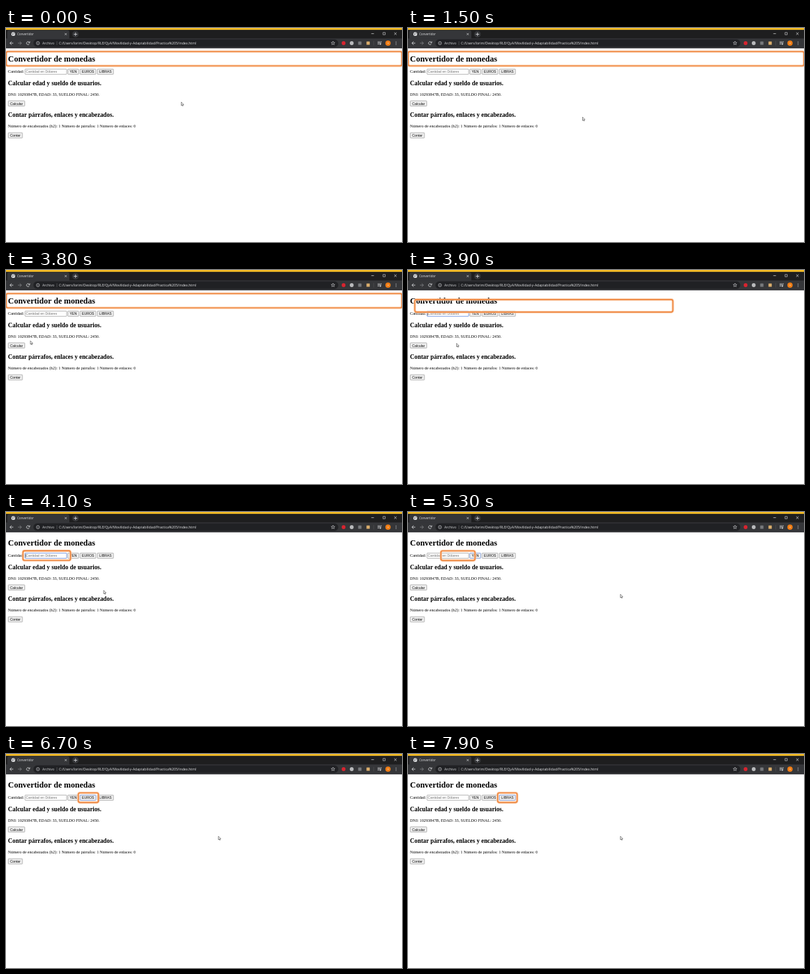
Write an HTML page with a canvas that moves like this. It is 600x325 px and loops after 8000 ms.

```html
<!DOCTYPE html>
<html lang="es">
<head>
<meta charset="utf-8">
<title>Convertidor</title>
<style>
html, body { margin: 0; width: 100%; height: 100%; overflow: hidden; background: #fff; }
canvas { display: block; width: 600px; height: 325px; }
</style>
</head>
<body>
<canvas id="stage"></canvas>
<script>
const W = 600, H = 325, LOOP = 8000;
const canvas = document.getElementById('stage');
const ctx = canvas.getContext('2d');
const dpr = window.devicePixelRatio || 1;
canvas.width = W * dpr;
canvas.height = H * dpr;

const SERIF = '"Liberation Serif", serif';
const SANS = '"Liberation Sans", sans-serif';
const UI = '"Open Sans", sans-serif';
const LIGHT = '#e4e5e7';

const clamp = v => Math.min(1, Math.max(0, v));
const mix = (a, b, k) => a + (b - a) * k;
const easeOut = k => 1 - (1 - k) ** 3;
const easeInOut = k => k * k * (3 - 2 * k);

function rect(x, y, w, h, color) {
  ctx.fillStyle = color;
  ctx.fillRect(x, y, w, h);
}

function box(x, y, w, h, r, fill, stroke, width) {
  ctx.beginPath();
  ctx.roundRect(x, y, w, h, r);
  if (fill) { ctx.fillStyle = fill; ctx.fill(); }
  if (stroke) { ctx.strokeStyle = stroke; ctx.lineWidth = width; ctx.stroke(); }
}

function disc(x, y, r, color) {
  ctx.beginPath();
  ctx.arc(x, y, r, 0, Math.PI * 2);
  ctx.fillStyle = color;
  ctx.fill();
}

function line(points, color = LIGHT, width = 0.7) {
  ctx.beginPath();
  for (const [x, y] of points) ctx.lineTo(x, y);
  ctx.strokeStyle = color;
  ctx.lineWidth = width;
  ctx.stroke();
}

function text(str, x, y, font, color = '#000', align = 'left') {
  ctx.font = font;
  ctx.fillStyle = color;
  ctx.textAlign = align;
  ctx.fillText(str, x, y);
}

function cross(x, y, r) {
  line([[x - r, y - r], [x + r, y + r]]);
  line([[x + r, y - r], [x - r, y + r]]);
}

function arrow(x, y, dir, color) {
  line([[x - 2.6 * dir, y], [x + 2.6 * dir, y]], color, 0.8);
  line([[x, y - 2.5], [x + 2.6 * dir, y], [x, y + 2.5]], color, 0.8);
}

function star(x, y, r) {
  const points = [];
  for (let i = 0; i <= 10; i++) {
    const a = i * Math.PI / 5 - Math.PI / 2, d = i % 2 ? r * 0.45 : r;
    points.push([x + d * Math.cos(a), y + d * Math.sin(a)]);
  }
  line(points, LIGHT, 0.6);
}

function drawTabs() {
  rect(0, 0, W, 16, '#1e1e1f');
  rect(0, 0, W, 2.8, '#f6bd27');
  box(2, 3.6, 94, 14, 3, '#353639');
  disc(11, 9.2, 2.9, LIGHT);
  line([[9, 8], [10.5, 9], [10.2, 11]], '#55575b', 0.9);
  line([[11.5, 7], [12.2, 8.4], [13.2, 9.6]], '#55575b', 0.8);
  text('Convertidor', 17, 10.9, '4.5px ' + UI, LIGHT);
  cross(90.5, 9.3, 1.5);
  disc(105.3, 9.5, 5, '#343538');
  line([[102.7, 9.5], [107.9, 9.5]], LIGHT, 0.8);
  line([[105.3, 6.9], [105.3, 12.1]], LIGHT, 0.8);
  line([[553.5, 8.6], [557.5, 8.6]]);
  box(571.2, 6.8, 3.4, 3.4, 0, null, LIGHT, 0.6);
  cross(590, 8.6, 1.8);
}

function drawToolbar() {
  rect(0, 15.8, W, 14.9, '#353639');
  rect(0, 30.3, W, 0.5, '#4a4b4e');
  arrow(8.5, 23, -1, LIGHT);
  arrow(20.8, 23, 1, '#87898c');
  ctx.beginPath();
  ctx.arc(33.4, 23, 2.3, 0.5, 5.6);
  ctx.strokeStyle = LIGHT;
  ctx.lineWidth = 0.8;
  ctx.stroke();
  line([[36, 20.3], [36, 22.4], [33.9, 22.4]], LIGHT, 0.8);

  box(41.5, 17.3, 462, 11.4, 5.7, '#202124');
  ctx.beginPath();
  ctx.arc(48.4, 23, 2.4, 0, Math.PI * 2);
  ctx.strokeStyle = LIGHT;
  ctx.lineWidth = 0.6;
  ctx.stroke();
  line([[48.4, 22.6], [48.4, 24.4]], LIGHT, 0.6);
  rect(48.1, 21.4, 0.6, 0.6, LIGHT);
  text('Archivo', 55, 24.9, '5.24px ' + UI, '#d3d5d8');
  rect(76.8, 20.2, 0.5, 5.8, '#77797c');
  text('C:/Users/lorim/Desktop/RLE/QyA/Movilidad-y-Adaptabilidad/Practica%205/index.html',
    80.2, 24.9, '5.24px ' + UI, LIGHT);
  star(495.5, 23, 2.9);

  disc(511.5, 23, 2.9, '#d8242f');
  disc(523.8, 23, 2.9, '#b9babc');
  box(533.6, 20.5, 5, 5, 0.5, '#77797c');
  box(546.2, 20.5, 5, 5, 0.5, '#d9ad6c');
  rect(556.8, 19.5, 0.5, 7, '#5d5f62');
  for (let i = 0; i < 3; i++) line([[563, 21 + i * 1.7], [i < 2 ? 567 : 565.5, 21 + i * 1.7]]);
  line([[569.2, 20.8], [567.9, 20.8], [567.9, 24.5]], LIGHT, 0.7);
  disc(567.2, 24.6, 1, LIGHT);
  disc(578.8, 23, 4, '#ef7d16');
  text('x', 578.8, 24.4, '4.2px ' + UI, '#fff', 'center');
  for (let i = -1; i < 2; i++) disc(591, 23 + i * 2, 0.6, LIGHT);
}

function button(label, x, y, w, focused) {
  box(x + 0.4, y + 0.3, w - 0.8, 7.9, 0.6, '#efefef', focused ? '#6d8fd6' : '#a3a3a3', 0.8);
  text(label, x + w / 2, y + 6.1, '5.21px ' + SANS, '#000', 'center');
}

function drawPage(focus, time) {
  rect(0, 30.8, W, H - 30.8, '#fff');
  const h2 = 'bold 9.375px ' + SERIF, p = '6.25px ' + SERIF;
  text('Convertidor de monedas', 3.1, 50.6, 'bold 12.5px ' + SERIF);
  text('Cantidad:', 3.1, 68.3, p);
  const active = focus === 1;
  box(28.9, 62.4, 62.9, 7.9, 0.4, '#fff', active ? '#5d87dc' : '#a3a3a3', 0.8);
  text('Cantidad en Dólares', 29.9, 68.2, '5.21px ' + SANS, '#757575');
  if (active) rect(29.6, 63.6, 0.6, 5.6, '#222');
  button('YEN', 93.2, 62.1, 17.3, focus === 2);
  button('EUROS', 111.8, 62.1, 24.8, focus === 3);
  button('LIBRAS', 138, 62.1, 25.2, focus === 4);

  text('Calcular edad y sueldo de usuarios.', 3.1, 86.8, h2);
  text('DNI: 10293847B, EDAD: 33, SUELDO FINAL: 2450.', 3.1, 102.6, p);
  button('Calcular', 3, 110.4, 25.8);
  text('Contar párrafos, enlaces y encabezados.', 3.1, 135, h2);
  text('Número de encabezados (h2): 1 Número de párrafos: 1 Número de enlaces: 0', 3.1, 150.8, p);
  button('Contar', 3, 158.8, 22.3);
}

// Focus stops: start time, then x, y, width, height of the ring
const stops = [
  [0, 0.3, 35.7, 599.6, 21.8],
  [3855, 25.8, 59, 69, 14.6],
  [5258, 90.5, 59, 22.5, 14.6],
  [6000, 109.5, 59, 30.6, 14.6],
  [6900, 135.8, 59, 29.6, 14.6]
];

function drawRing(focus, time) {
  const to = stops[focus], from = stops[Math.max(0, focus - 1)];
  const k = easeOut(clamp((time - to[0]) / 300));
  const [x, y, w, h] = [1, 2, 3, 4].map(i => mix(from[i], to[i], k));
  ctx.save();
  box(x, y, w, h, 2.6, null, 'rgba(255,222,196,0.75)', 3.6);
  ctx.shadowColor = 'rgba(240,130,50,0.6)';
  ctx.shadowBlur = 2 * dpr;
  box(x, y, w, h, 2.6, null, '#ee8740', 1.6);
  ctx.restore();
}

// Pointer keys: time, x, y, easing into the key
const linear = k => k;
const path = [
  [0, 265.6, 112.6, linear],
  [1400, 265.6, 112.6, linear],
  [1700, 261.6, 199, easeInOut],
  [2720, 261.6, 199, linear],
  [3620, 36.6, 107.6, easeInOut],
  [3800, 36.6, 107.6, linear],
  [4100, 146.6, 119, linear],
  [4480, 321.8, 125, easeOut],
  [LOOP, 321.8, 125, linear]
];

function drawPointer(time) {
  const i = path.findIndex(key => key[0] > time);
  const a = path[i - 1], b = path[i];
  const k = b[3]((time - a[0]) / (b[0] - a[0]));
  ctx.save();
  ctx.translate(mix(a[1], b[1], k), mix(a[2], b[2], k));
  ctx.beginPath();
  for (const [x, y] of [[0, 0], [0, 5.2], [1.2, 4.1], [2, 5.9], [2.8, 5.5], [2, 3.8], [3.7, 3.7]]) ctx.lineTo(x, y);
  ctx.closePath();
  ctx.fillStyle = '#fff';
  ctx.fill();
  ctx.strokeStyle = '#333';
  ctx.lineWidth = 0.6;
  ctx.stroke();
  ctx.restore();
}

function draw(time) {
  const focus = stops.filter(s => s[0] <= time).length - 1;
  ctx.setTransform(dpr, 0, 0, dpr, 0, 0);
  drawPage(focus, time);
  drawRing(focus, time);
  drawTabs();
  drawToolbar();
  drawPointer(time);
}

const start = performance.now();
function tick() {
  draw((performance.now() - start) % LOOP);
  requestAnimationFrame(tick);
}
tick();
</script>
</body>
</html>
```
